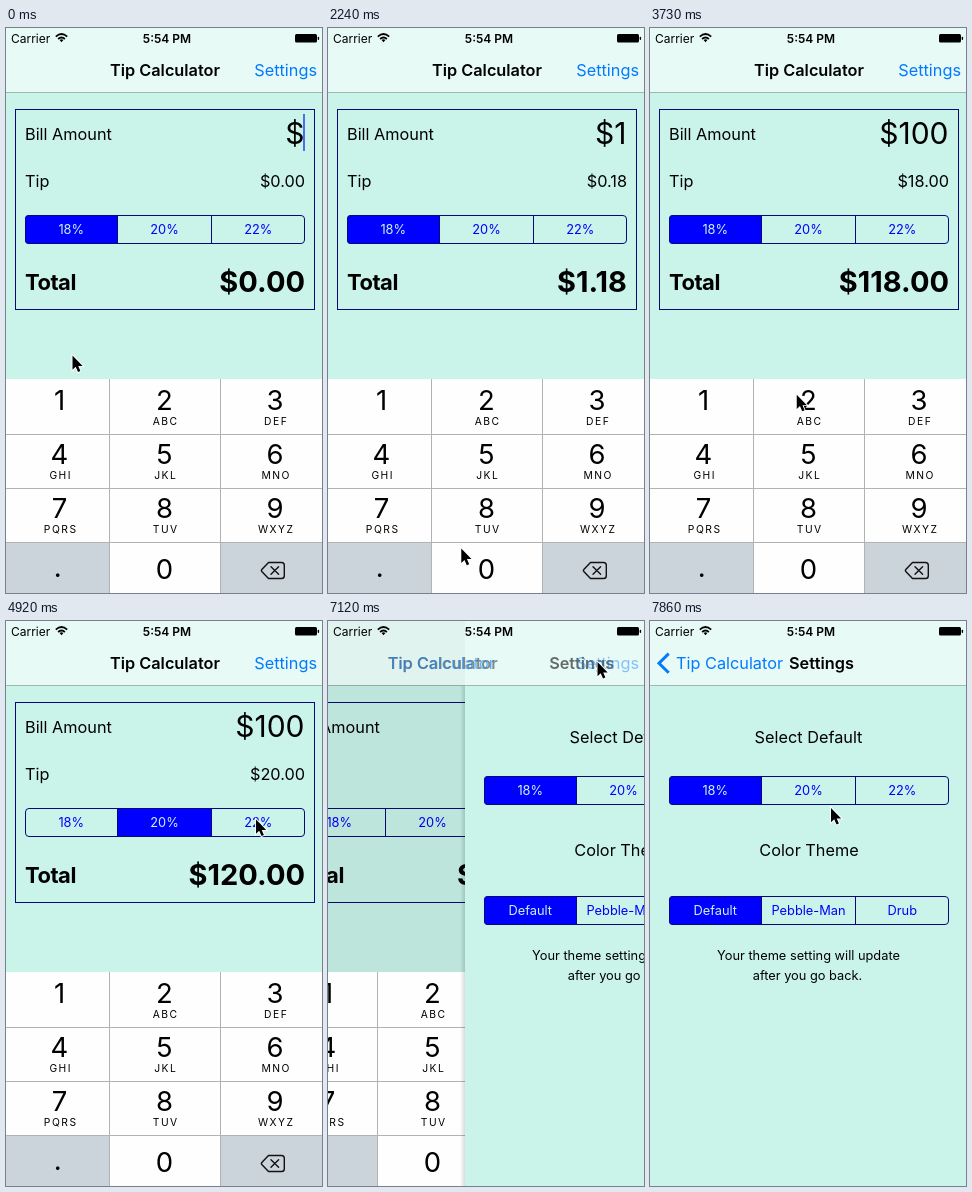
An HTML page that plays this animation: 316x565 px, repeating every 8000 ms.

```html
<!DOCTYPE html>
<html lang="en">
<head>
<meta charset="utf-8">
<title>Tip Calculator</title>
<style>
  html, body { margin: 0; width: 100%; height: 100%; overflow: hidden; background: #caf4ea; }
  svg { display: block; width: 100%; height: 100%; font-family: Inter, Roboto, sans-serif; font-size: 16.3px; }
  .mid { text-anchor: middle; }
  .end { text-anchor: end; }
  .semi { font-weight: 600; }
  .bold { font-weight: 700; }
  .tint { fill: #007aff; }
  .small { font-size: 12.8px; }
  .status { font-size: 12px; }
  .digit { font-size: 27.5px; }
  .letters { font-size: 10.3px; letter-spacing: 1.5px; }
</style>
</head>
<body>
<svg id="stage" viewBox="0 0 316 565"></svg>
<script>
const LOOP = 8000, WIDTH = 316;
const MINT = '#caf4ea', BLUE = '#0000ff', EDGE = '#080878', GREY = '#cbd3db';
const RATES = [18, 20, 22];
const $ = id => document.getElementById(id);

const text = (x, y, str, cls = '', id = '') =>
  `<text x="${x}" y="${y}" class="${cls}"${id && ` id="${id}"`}>${str}</text>`;
const rect = (x, y, w, h, fill, more = '') =>
  `<rect x="${x}" y="${y}" width="${w}" height="${h}" fill="${fill}" ${more}/>`;

const SEGMENT_X = [19, 111.5, 205.5, 299];

function segments(name, y, labels) {
  const cells = labels.map((label, i) => {
    const x = SEGMENT_X[i], w = SEGMENT_X[i + 1] - x;
    return rect(x, y, w, 29, 'none', `id="${name}${i}"`) +
      text(x + w / 2, y + 19.2, label, 'mid small', `${name}Label${i}`);
  }).join('');
  return `<clipPath id="${name}Clip">${rect(19, y, 280, 29, '#000', 'rx="4"')}</clipPath>
    <g clip-path="url(#${name}Clip)">${cells}</g>
    <path d="M111.5 ${y}v29M205.5 ${y}v29" stroke="${EDGE}"/>` +
    rect(19.5, y + .5, 279, 28, 'none', `rx="3.5" stroke="${EDGE}"`);
}

function select(name, chosen, pressed = -1) {
  for (let i = 0; i < 3; i++) {
    const on = i === chosen;
    $(name + i).setAttribute('fill', on ? BLUE : i === pressed ? 'rgba(0,0,255,.15)' : 'none');
    $(name + 'Label' + i).setAttribute('fill', on ? MINT : BLUE);
  }
}

const COLS = [0, 104, 215, WIDTH], CENTRES = [53.5, 158.5, 269];
const LETTERS = ['', 'ABC', 'DEF', 'GHI', 'JKL', 'MNO', 'PQRS', 'TUV', 'WXYZ'];

function keypad() {
  let out = rect(0, 351, WIDTH, 214, '#fefefe');
  out += rect(0, 515, 104, 50, GREY) + rect(214, 515, 102, 50, GREY);
  out += rect(0, 351, 104, 55, GREY, 'id="key1"') + rect(104, 515, 110, 50, GREY, 'id="key0"');
  out += '<path d="M0 406.5H316M0 460.5H316M0 514.5H316M103.5 351V565M214.5 351V565" stroke="#b0b2b4"/>';
  LETTERS.forEach((letters, i) => {
    const x = CENTRES[i % 3], y = 382 + 54 * Math.floor(i / 3);
    out += text(x, y, i + 1, 'mid digit') + text(x + 1.2, y + 15, letters, 'mid letters');
  });
  out += text(158.5, 551, '0', 'mid digit') + text(51.8, 549, '.', 'mid digit');
  return out + `<path d="M262.5 534.5H275.5Q278.3 534.5 278.3 537.3V547.7Q278.3 550.5 275.5 550.5H262.5L255.8 543.5Q255 542.5 255.8 541.5Z
    M265 538.7l7.6 7.6M272.6 538.7l-7.6 7.6" fill="none" stroke="#111" stroke-width="1.4" stroke-linejoin="round" stroke-linecap="round"/>`;
}

const percents = RATES.map(r => r + '%');

$('stage').innerHTML = `
  <defs><linearGradient id="shade">
    <stop offset="0" stop-opacity="0"/><stop offset="1" stop-opacity=".14"/>
  </linearGradient></defs>
  <g id="home">
    ${rect(0, 0, WIDTH, 565, MINT)}
    ${rect(9.5, 81.5, 299, 200, 'none', `stroke="${EDGE}"`)}
    ${text(19, 111.5, 'Bill Amount')}
    ${text(298.5, 116, '', 'end', 'bill')}
    ${rect(297, 86, 2, 37, '#4a6ff0', 'id="caret"')}
    ${text(19, 158.5, 'Tip')}
    ${text(299, 158.5, '', 'end', 'tip')}
    ${segments('rate', 187, percents)}
    ${text(19, 262, 'Total', 'bold', 'totalLabel')}
    ${text(299, 264, '', 'end bold', 'total')}
  </g>
  ${rect(0, 0, WIDTH, 565, '#000', 'id="dim"')}
  <g id="keypad">${keypad()}</g>
  <g id="settings">
    ${rect(-5, 65, 5, 500, 'url(#shade)')}
    ${rect(0, 0, WIDTH, 565, MINT)}
    ${text(158.5, 121.5, 'Select Default', 'mid')}
    ${segments('preset', 155, percents)}
    ${text(159, 234.5, 'Color Theme', 'mid')}
    ${segments('theme', 275, ['Default', 'Pebble-Man', 'Drub'])}
    ${text(158.5, 339, 'Your theme setting will update', 'mid small')}
    ${text(157.5, 359, 'after you go back.', 'mid small')}
  </g>
  ${rect(0, 0, WIDTH, 64, '#fff', 'opacity=".55"')}
  ${rect(0, 64, WIDTH, 1, '#000', 'opacity=".24"')}
  ${text(5, 14.6, 'Carrier', 'status')}
  <g fill="none" stroke="#000" stroke-width="1.7">
    <path d="M49.8 8.6Q55.5 3.4 61.2 8.6M52.1 11Q55.5 8 58.9 11"/>
    <path d="M53.6 12L55.5 14.2 57.4 12Q55.5 10.6 53.6 12Z" fill="#000" stroke="none"/>
  </g>
  ${text(161, 14.6, '5:54 PM', 'mid semi status')}
  ${rect(289, 6, 22, 8.5, '#000', 'rx="1.5"')}
  ${rect(311.7, 8.7, 1.4, 3.2, '#000', 'rx=".7"')}
  ${text(0, 48, 'Tip Calculator', 'semi', 'homeTitle')}
  ${text(0, 48, 'Tip Calculator', 'tint', 'backLabel')}
  ${text(0, 48, 'Settings', 'semi', 'settingsTitle')}
  ${text(311, 48, 'Settings', 'end tint', 'settingsButton')}
  <path id="chevron" d="M18.7 32.6L9 42.2L18.7 51.8" fill="none" stroke="#007aff" stroke-width="3"/>
  <path id="cursor" d="M0 0V14.3L3.2 11.3L5.5 16.6L7.9 15.6L5.7 10.4H10.2Z" stroke="#fff" stroke-width="1.8" paint-order="stroke"/>`;

$('bill').style.fontSize = '30px';
$('total').style.fontSize = '29px';
$('totalLabel').style.cssText = 'font-size:22px;letter-spacing:-.5px';
select('preset', 0);
select('theme', 0);

// The picture refreshes about every 148 ms; all timing below counts these ticks.
const tickAt = t => t < 4920 ? Math.floor((t + 10) / 149.2) : 33 + Math.floor((t - 4910) / 146.9);

// Pointer moves: last tick at rest, tick of arrival, x, y
const MOVES = [
  [0, 0, 66.5, 327.5], [3, 7, 62.5, 383.5], [11, 16, 141.5, 536.5], [22, 28, 152, 197],
  [31, 33, 250, 198.5], [40, 44, 274, 61.5], [44, 46, 269.5, 41], [49, 53, 181, 187]
];
const BLINKS = [1, 4, 7, 10, 15, 18, 25, 28, 31, 35, 38, 41, 45];

const smooth = u => u * u * (3 - 2 * u);
const mix = (a, b, u) => a + (b - a) * u;

function pointer(k) {
  let [, , x, y] = MOVES[0];
  for (const [from, to, nx, ny] of MOVES.slice(1)) {
    if (k <= from) break;
    const u = smooth(Math.min(1, (k - from) / (to - from)));
    x = mix(x, nx, u);
    y = mix(y, ny, u);
  }
  return [x, y];
}

// Critically damped push from one page to the next
function pushed(k) {
  if (k < 48) return 0;
  if (k > 50) return 1;
  const s = (k - 47.2) * .147 * 16.2;
  return 1 - (1 + s) * Math.exp(-s);
}

const shift = (id, x, y = 0) => $(id).setAttribute('transform', `translate(${x} ${y})`);
const fade = (id, a) => $(id).setAttribute('opacity', a);
const money = n => '$' + n.toFixed(2);

function draw(t) {
  const k = tickAt(t);
  const typed = k < 11 ? '' : k < 18 ? '1' : k < 21 ? '10' : '100';
  const choice = k < 31 ? 0 : k < 37 ? 1 : 2;
  const bill = Number(typed), tip = bill * RATES[choice] / 100;
  $('bill').textContent = '$' + typed;
  $('tip').textContent = money(tip);
  $('total').textContent = money(bill + tip);
  select('rate', choice, k === 30 ? 1 : k === 36 ? 2 : -1);
  fade('caret', BLINKS.filter(b => b <= k).length % 2 ? 0 : 1);
  fade('key1', k === 10 ? 1 : 0);
  fade('key0', k === 17 || k === 20 ? 1 : 0);

  const p = pushed(k), rest = 1 - p;
  const parallax = Math.round(-95 * p);
  shift('home', parallax);
  shift('keypad', parallax);
  shift('settings', p ? Math.round(WIDTH * rest) : WIDTH + 10);
  fade('dim', .11 * p);

  const labelX = mix(104, 26, p);
  shift('homeTitle', labelX);
  shift('backLabel', labelX);
  shift('settingsTitle', mix(329, 139, p));
  fade('homeTitle', rest < .1 ? 0 : rest);
  fade('backLabel', p);
  fade('settingsTitle', p);
  fade('settingsButton', k === 47 ? .3 : rest);
  fade('chevron', Math.max(0, p * 10 - 9));
  shift('cursor', ...pointer(k));
}

const start = performance.now();
function frame() {
  draw((performance.now() - start) % LOOP);
  requestAnimationFrame(frame);
}
frame();
</script>
</body>
</html>
```
